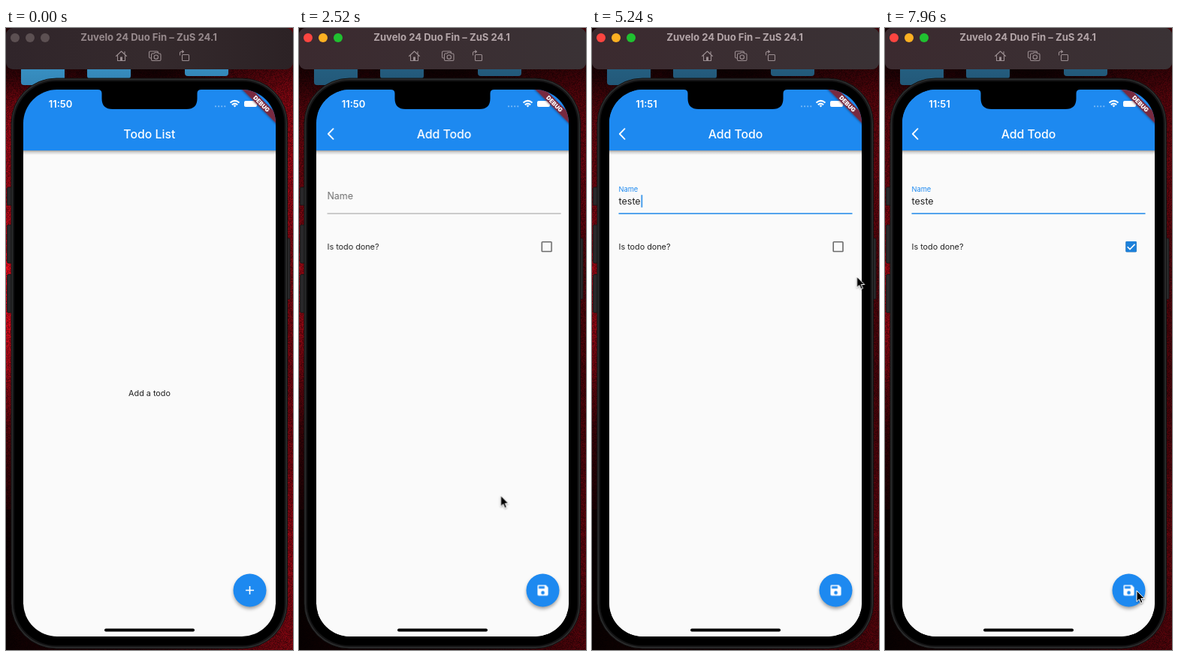
These frames come from a looping animation (382 px wide and 828 px high, 8000 ms). An HTML page with a canvas:

```html
<!DOCTYPE html>
<html lang="en">
<head>
<meta charset="utf-8">
<title>Todo app demo</title>
<style>
@property --typed { syntax: "<integer>"; inherits: true; initial-value: 0; }
html, body { margin: 0; width: 100%; height: 100%; overflow: hidden; background: #12060a; }
canvas, svg { position: absolute; left: 0; top: 0; width: 382px; height: 828px; }
svg { font-family: Inter, "Open Sans", sans-serif; }
.mid { text-anchor: middle; }
.bar { font-size: 15.8px; font-weight: 500; fill: #fff; }
.body { font-size: 10.8px; fill: #212121; }
.clock { font-size: 13px; font-weight: 600; fill: #fff; }
.line { fill: none; stroke-linecap: round; stroke-linejoin: round; }

/* 1% = 80 ms */
svg [class*="t-"] { animation: 8s linear infinite; }

svg .t-dim { animation-name: dim; }
@keyframes dim { 0%, 16.5% { opacity: 0; } 18.5%, 100% { opacity: .34; } }
svg .t-active { animation: active 8s step-end infinite; }
@keyframes active { 0% { opacity: 0; } 16.5%, 100% { opacity: 1; } }
svg .t-title { animation: title 8s step-end infinite; }
@keyframes title { 0% { fill: #978a8d; } 16.5%, 100% { fill: #b3a5a8; } }

svg .t-before { animation: before 8s step-end infinite; }
@keyframes before { 0% { opacity: 1; } 26%, 100% { opacity: 0; } }
svg .t-after { animation: after 8s step-end infinite; }
@keyframes after { 0% { opacity: 0; } 26%, 100% { opacity: 1; } }
svg .t-old { animation: old 8s step-end infinite; }
@keyframes old { 0% { opacity: 1; } 33.75%, 100% { opacity: 0; } }
svg .t-new { animation: new 8s step-end infinite; }
@keyframes new { 0% { opacity: 0; } 33.75%, 100% { opacity: 1; } }

svg .t-list { animation-name: list; }
@keyframes list {
  0%, 26% { transform: translateX(0); animation-timing-function: cubic-bezier(.35,.91,.33,.97); }
  32.25%, 100% { transform: translateX(-112px); }
}
svg .t-form { animation-name: form; }
@keyframes form {
  0%, 26% { transform: translateX(337px); animation-timing-function: cubic-bezier(.35,.91,.33,.97); }
  32.25%, 100% { transform: translateX(0); }
}

svg .t-label { animation-name: label; font-size: 12.4px; }
@keyframes label {
  0%, 41% { transform: translate(35.5px, 228px); fill: #6e6e6e; animation-timing-function: cubic-bezier(.4,0,.2,1); }
  43.25%, 100% { transform: translate(35.5px, 217.7px) scale(.75); fill: #1d89f0; }
}
svg .t-rule { animation-name: rule; }
@keyframes rule {
  0%, 41% { stroke: #929292; stroke-width: .9px; }
  43.25%, 100% { stroke: #1d87e8; stroke-width: 1.6px; }
}
svg .t-type { animation: type 8s step-end infinite; font-size: 12.5px; fill: #212121; }
@keyframes type {
  0% { --typed: 0; } 43.75% { --typed: 1; } 45.6% { --typed: 2; }
  47.5% { --typed: 3; } 49.4% { --typed: 4; } 51.25%, 100% { --typed: 5; }
}
.t-type tspan { fill-opacity: clamp(0, var(--typed) - var(--i), 1); }
svg .t-caret { animation: caret 8s step-end infinite; }
@keyframes caret {
  0% { transform: translateX(0); } 43.75% { transform: translateX(4.7px); }
  45.6% { transform: translateX(12px); } 47.5% { transform: translateX(18.7px); }
  49.4% { transform: translateX(23.2px); } 51.25%, 100% { transform: translateX(30.3px); }
}
svg .t-blink { animation-name: blink; }
@keyframes blink {
  0%, 40.4% { opacity: 0; } 40.5%, 57.5% { opacity: 1; }
  59.1%, 63.75% { opacity: 0; } 65.3%, 70% { opacity: 1; }
  71.6%, 76.25% { opacity: 0; } 77.9%, 82.5% { opacity: 1; }
  84.1%, 88.75% { opacity: 0; } 90.4%, 95% { opacity: 1; }
  96.6%, 100% { opacity: 0; }
}
svg .t-check { animation-name: check; }
@keyframes check { 0%, 72% { opacity: 0; } 73.2%, 100% { opacity: 1; } }
svg .t-tick { animation-name: tick; stroke-dasharray: 14; }
@keyframes tick { 0%, 72.8% { stroke-dashoffset: 14; } 74.5%, 100% { stroke-dashoffset: 0; } }

svg .t-mouse { animation-name: mouse; animation-timing-function: ease-in-out; }
@keyframes mouse {
  0%, 4% { transform: translate(390px, 690px); }
  10.5%, 14% { transform: translate(311px, 739px); }
  20%, 28% { transform: translate(324px, 744px); }
  38.5%, 55.5% { transform: translate(86px, 223px); }
  64%, 66% { transform: translate(352.5px, 331px); }
  70%, 74.5% { transform: translate(328px, 291px); }
  80%, 86% { transform: translate(392px, 330px); }
  95%, 100% { transform: translate(335px, 749px); }
}
</style>
</head>
<body>
<canvas id="wall" width="382" height="828"></canvas>
<svg viewBox="0 0 382 828">
  <defs>
    <clipPath id="screen"><rect x="23" y="82" width="336" height="728" rx="45"/></clipPath>
    <linearGradient id="chrome"><stop stop-color="#30252a"/><stop offset=".5" stop-color="#352a2d"/><stop offset="1" stop-color="#2c2225"/></linearGradient>
    <linearGradient id="chromeActive"><stop stop-color="#3b2a2f"/><stop offset="1" stop-color="#3a3235"/></linearGradient>
    <linearGradient id="folder" x2="0" y2="1"><stop stop-color="#3a95c9"/><stop offset="1" stop-color="#3486b7"/></linearGradient>
    <linearGradient id="barShade" x2="0" y2="1"><stop stop-opacity=".36"/><stop offset=".4" stop-opacity=".15"/><stop offset="1" stop-opacity="0"/></linearGradient>
    <filter id="blur" x="-30%" y="-30%" width="160%" height="160%"><feGaussianBlur stdDeviation="2.4"/></filter>
    <filter id="tiny" x="-50%" y="-50%" width="200%" height="200%"><feDropShadow dx="0" dy="1" stdDeviation="1" flood-opacity=".35"/></filter>
    <g id="appBar">
      <rect x="23" y="81" width="336" height="82" fill="#1d89f0"/>
      <rect x="23" y="163" width="336" height="6" fill="url(#barShade)"/>
    </g>
  </defs>

  <g fill="url(#folder)">
    <rect x="20" y="40" width="58" height="36" rx="4"/>
    <rect x="108" y="40" width="58" height="27.5" rx="4"/>
    <rect x="238" y="40" width="58" height="24" rx="4"/>
  </g>
  <rect class="t-dim" width="382" height="828"/>

  <!-- window bar -->
  <rect width="382" height="55" rx="9" fill="url(#chrome)"/>
  <g fill="#5c5052"><circle cx="12" cy="13" r="6"/><circle cx="32" cy="13" r="6"/><circle cx="52" cy="13" r="6"/></g>
  <g class="t-active">
    <rect width="382" height="55" rx="9" fill="url(#chromeActive)"/>
    <circle cx="12" cy="13" r="6" fill="#fc4540"/><circle cx="32" cy="13" r="6" fill="#fdb022"/><circle cx="52" cy="13" r="6" fill="#20c030"/>
  </g>
  <text class="mid t-title" x="190" y="17.3" font-size="13.1" font-weight="700">Zuvelo 24 Duo Fin – ZuS 24.1</text>
  <g class="line" stroke="#9b8e91" stroke-width="1.1">
    <path d="M146.5 37.5L153.5 31L160.5 37.5M148.5 36.5V43.5H158.5V36.5M158 34.5V31.5"/>
    <rect x="152" y="38.5" width="3" height="5" fill="#9b8e91" stroke="none"/>
    <path d="M193 40H192Q190.500 40 190.500 38.500V32.500Q190.500 31 192 31H201Q202.500 31 202.500 32.500"/>
    <path d="M194.500 34H197L198 32.800H202L203 34H204.500Q206 34 206 35.500V42Q206 43.500 204.500 43.500H195Q193.500 43.500 193.500 42V35.500Q193.500 34 195 34Z"/>
    <circle cx="199.800" cy="38.700" r="2.700"/>
    <rect x="234.500" y="35.500" width="9" height="8" rx="1"/>
    <path d="M231.500 36V33.500Q231.500 31.500 233.500 31.500H236M234.500 29.800L236.500 31.500L234.500 33.200"/>
  </g>

  <!-- phone body -->
  <g fill="#28282a" stroke="#151516" stroke-width=".8">
    <rect x="1.500" y="212" width="8" height="24" rx="1.500"/>
    <rect x="1.500" y="262" width="8" height="51" rx="1.500"/>
    <rect x="1.500" y="328" width="8" height="51" rx="1.500"/>
    <rect x="371" y="280" width="7" height="81" rx="1.500"/>
  </g>
  <rect x="7" y="67" width="367.500" height="759" rx="60" fill="#2d2e2f" stroke="#111" stroke-width="1"/>
  <rect x="9" y="69" width="363.500" height="755" rx="58" fill="#141415"/>
  <rect x="11" y="71" width="359.500" height="751" rx="56"/>

  <g clip-path="url(#screen)">
    <rect x="23" y="163" width="336" height="647" fill="#fafafa"/>

    <g class="t-list">
      <use href="#appBar"/>
      <text class="mid bar" x="190.800" y="146.800">Todo List</text>
      <text class="mid body" x="191" y="490">Add a todo</text>
    </g>

    <g class="t-form">
      <rect x="23" y="163" width="336" height="647" fill="#fafafa"/>
      <use href="#appBar"/>
      <path class="line" d="M43.500 134.200L36.800 141L43.500 147.800" stroke="#fff" stroke-width="1.800"/>
      <text class="mid bar" x="191" y="146.800">Add Todo</text>
      <text class="t-label">Name</text>
      <path class="t-rule" d="M35.500 247H346.500"/>
      <text class="t-type" x="35.500" y="234.500"><tspan style="--i:0">t</tspan><tspan style="--i:1">e</tspan><tspan style="--i:2">s</tspan><tspan style="--i:3">t</tspan><tspan style="--i:4">e</tspan></text>
      <g class="t-caret"><rect class="t-blink" x="35.200" y="222" width="1.600" height="17" rx=".8" fill="#1d87e8"/></g>
      <text class="body" x="35.500" y="295">Is todo done?</text>
      <rect x="321.200" y="284.700" width="12.800" height="12.800" rx=".8" fill="none" stroke="#6b6b6b" stroke-width="1.600"/>
      <g class="t-check">
        <rect x="320.400" y="283.900" width="14.400" height="14.400" rx="1.200" fill="#1c80da"/>
        <path class="t-tick" d="M322.700 291.200L326 294.500L332.600 287.800" fill="none" stroke="#fff" stroke-width="1.600"/>
      </g>
    </g>

    <!-- floating button keeps its place through the page change -->
    <circle cx="324.500" cy="751.500" r="21.500" opacity=".4" filter="url(#blur)"/>
    <circle cx="324.500" cy="748.500" r="22" fill="#1d89f0"/>
    <path class="t-before" d="M319 748.500H330M324.500 743V754" stroke="#fff" stroke-width="1.600"/>
    <g class="t-after"><path transform="translate(315.100 739.100) scale(.785)" fill="#fff" d="M17 3H5c-1.110 0-2 .9-2 2v14c0 1.100.89 2 2 2h14c1.100 0 2-.9 2-2V7l-4-4zm-5 16c-1.660 0-3-1.340-3-3s1.340-3 3-3 3 1.340 3 3-1.340 3-3 3zm3-10H5V5h10v4z"/></g>

    <!-- status bar -->
    <text class="clock mid t-old" x="72.500" y="105.800">11:50</text>
    <text class="clock mid t-new" x="72.500" y="105.800">11:51</text>
    <path d="M279 104.300H292" stroke="#79b9f6" stroke-width="2.200" stroke-linecap="round" stroke-dasharray="0 4.100"/>
    <g fill="none" stroke="#fff" stroke-width="2">
      <path d="M298.500 99.500Q304.500 94.300 310.500 99.500M300.800 102.200Q304.500 99 308.200 102.200"/>
      <path d="M302.600 103.300L304.500 105.500L306.400 103.300Q304.500 101.900 302.600 103.300Z" fill="#fff" stroke="none"/>
    </g>
    <rect x="317" y="97" width="17" height="8" rx="2" fill="#fff"/>
    <rect x="335" y="99.500" width="1.300" height="3" rx=".6" fill="#fff"/>
    <g transform="translate(359 82) rotate(45)">
      <rect x="-40" y="22" width="80" height="9.400" fill="#782b40" filter="url(#tiny)"/>
      <text class="mid" x="0" y="29.600" font-size="7.800" font-weight="900" fill="#fff">DEBUG</text>
    </g>
    <path d="M122 81H260V82Q254.500 82 254.500 87V94Q254.500 108 240 108H142Q127.500 108 127.500 94V87Q127.500 82 122 82Z"/>
    <rect x="131" y="799.500" width="120" height="4" rx="2"/>
  </g>

  <g class="t-mouse">
    <path d="M0 0V14.500L3.300 11.400L5.600 16.600L8 15.500L5.800 10.500H10.200Z" fill="#000" stroke="#fff" stroke-width="1" stroke-linejoin="round" filter="url(#tiny)"/>
  </g>
</svg>
<script>
// Grainy red wallpaper around the phone
const ctx = document.getElementById("wall").getContext("2d");
const W = 382, H = 828;
const img = ctx.createImageData(W, H);
let seed = 7;
const random = () => (seed = (seed * 1664525 + 1013904223) >>> 0) / 4294967296;
const bump = (v, center, width) => Math.exp(-(((v - center) / width) ** 2));

for (let y = 0; y < H; y++) {
  for (let x = 0; x < W; x++) {
    const left = 30 + 180 * bump(y, 340, 170) + 60 * bump(y, 130, 60) - 20 * (y > 640);
    const right = 100 + 35 * bump(y, 180, 110) + 25 * bump(y, 700, 110);
    const side = x / W;
    const edge = 1 - .5 * bump(x, W / 2, 110) - .3 * bump(y, 50, 30);
    const red = (left * (1 - side) + right * side) * edge * (.65 + .6 * random());
    img.data.set([red, red * .05, red * .13, 255], (y * W + x) * 4);
  }
}
ctx.putImageData(img, 0, 0);
</script>
</body>
</html>
```
